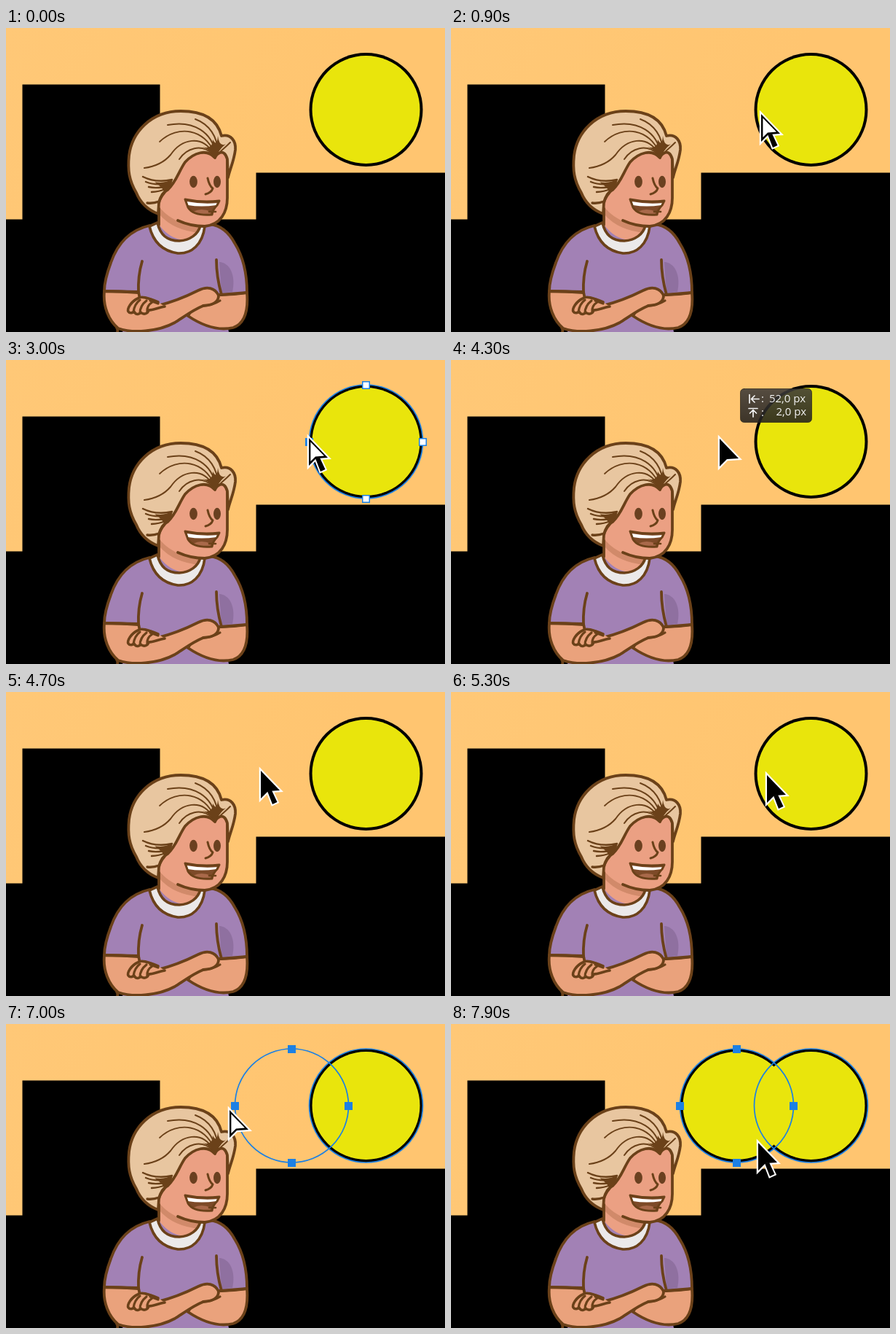
Animation of 603 by 417 pixels, one loop 8 s. Source, as an HTML page with a canvas:

```html
<!DOCTYPE html>
<html lang="en">
<head>
<meta charset="utf-8">
<title>Duplicating a circle path</title>
<style>
html, body { margin: 0; width: 100%; height: 100%; overflow: hidden; background: #000; }
canvas { display: block; width: 603px; height: 417px; }
</style>
</head>
<body>
<canvas id="stage" width="603" height="417"></canvas>
<script>
const ctx = document.getElementById('stage').getContext('2d');
const LOOP = 8000, STEP = 100;
const BLUE = '#1c80e4', BROWN = '#6b4119', SKIN = '#eaa27c', FACE = '#eba083', SHADE = '#d18a6a';
const HAIR = '#e8c6a0', SHIRT = '#a281b5', SHIRT_DARK = '#8f70a0', YELLOW = '#e9e50c';
const SUN = { x: 494.5, y: 112, r: 78 };
const COPY_SHIFT = 102;

// Pointer route: time, x, y
const route = [
  [400, 570, 133], [800, 403, 120], [900, 426, 118], [1200, 426, 118],
  [1600, 416, 100], [2100, 416, 100], [2200, 418, 104], [2700, 417, 104],
  [3000, 416, 107], [3200, 416, 107], [3400, 416, 108], [3700, 416, 109],
  [4300, 369, 108], [4600, 350, 108], [4800, 350, 108], [5300, 434, 114],
  [5400, 434, 114], [5700, 422, 118], [6400, 422, 118], [7000, 307, 118],
  [7100, 304, 118], [7300, 335, 115], [7600, 467, 140], [7900, 422, 163]
];

function pointerAt(t) {
  const i = route.findIndex(k => k[0] > t);
  if (i < 0) return route[route.length - 1].slice(1);
  const [t0, x0, y0] = route[i - 1], [t1, x1, y1] = route[i];
  const p = (t - t0) / (t1 - t0);
  return [x0 + (x1 - x0) * p, y0 + (y1 - y0) * p];
}

function shape(d, fill, stroke, width = 3.8) {
  const path = new Path2D(d);
  if (fill) { ctx.fillStyle = fill; ctx.fill(path); }
  if (stroke) { ctx.strokeStyle = stroke; ctx.lineWidth = width; ctx.stroke(path); }
}
const line = (d, width) => shape(d, null, BROWN, width);

function rect(x, y, w, h, fill) {
  ctx.fillStyle = fill;
  ctx.fillRect(x, y, w, h);
}

function disc(x, y, rx, ry, fill) {
  ctx.beginPath();
  ctx.ellipse(x, y, rx, ry, 0, 0, Math.PI * 2);
  ctx.fillStyle = fill;
  ctx.fill();
}

function drawScenery() {
  const sky = ctx.createLinearGradient(0, 0, 400, 200);
  sky.addColorStop(0, '#ffc877');
  sky.addColorStop(1, '#ffc570');
  rect(0, 0, 603, 417, sky);
  rect(22.5, 77.5, 189, 190, '#000');
  rect(0, 262.5, 603, 155, '#000');
  rect(343.5, 198.5, 260, 70, '#000');
}

function drawBody() {
  const shirt = 'M197 271C167 278 152 299 144 322C138 338 135 350 135 361L182 363L160 417H306L296 366L331 363' +
    'C331 339 326 314 314 295C306 280 295 271 280 269Z';
  shape(shirt, SHIRT);
  shape('M293 321C307 322 316 338 311 362L296 364Z', SHIRT_DARK);
  line('M135 361C135 350 138 338 144 322C152 299 167 278 197 271');
  line('M280 269C295 271 306 280 314 295C326 314 331 339 331 363');

  // Right arm, passing under
  shape('M294 366L331 363C333 389 327 406 312 411C291 416 268 407 250 395L262 374Z', SKIN, BROWN);

  // Left arm, crossing over
  shape('M135 361C133 382 141 401 154 412C174 419 208 417 232 404C246 395 258 386 271 381' +
    'C283 380 292 377 292 367C287 356 276 354 264 360C244 370 229 376 208 381L184 372L182 362Z', SKIN, BROWN);
  line('M152 411Q154 414 153 417');
  line('M270 381Q283 381 294 374', 3.2);

  // Folded hand
  shape('M209 376C195 370 185 367 181 371C172 375 166 385 168 389C171 393 176 389 176 389' +
    'C179 395 184 392 185 390C189 394 195 392 196 387C202 387 208 384 218 382', SKIN, BROWN, 3.6);
  line('M184 373Q176 379 175 390M193 374Q184 381 184 391M201 376Q193 381 194 389', 3.2);
  line('M198 374L209 378', 3.2);

  line('M135 361Q158 361 182 363M293 366Q314 366 331 363');
  line('M187 320Q181 340 182 363M289 318Q289 341 296 366');
}

function drawHead() {
  shape('M210 234V270Q237 304 268 281V262Z', FACE);
  shape('M211 246C222 260 242 271 268 272L267 281Q230 278 211 256Z', SHADE);
  line('M210 238V270');
  shape('M197 272L208 267C212 285 222 292 238 292C253 291 264 283 267 271L273 272' +
    'C270 297 255 310 236 309C215 306 202 293 197 272Z', '#ebe9e9', BROWN, 3.6);

  shape('M287 160L304 178V233C304 252 295 270 273 272C250 272 228 264 211 246V215L240 175Z', FACE);
  line('M304 180V233C304 252 295 270 273 272C259 272 247 269 236 264');

  disc(257.5, 211, 5.4, 8.2, '#6a4020');
  disc(290, 211, 5, 8.2, '#6a4020');
  line('M277 206Q279 216 284 220Q282 226 274 228', 3);

  const mouth = 'M246 235Q270 240 293 237L290 243Q284 249 283 256Q257 258 250 246Z';
  shape(mouth, '#7d4a28');
  shape('M257 252Q268 246 282 252L280 256Q265 257 257 252Z', '#a9694a');
  shape('M248 238Q270 242 291 240L289 243Q268 246 250 243Z', '#fff');
  line(mouth, 3);
  line('M279 252H288', 2.6);
}

function drawHair() {
  const outline = 'M209 255C196 250 185 241 179 226C169 209 167 195 169 175C173 143 199 114 240 114' +
    'C270 114 290 124 296 148C309 145 316 155 315 167C313 183 308 192 305 205L304 180' +
    'Q301 169 294 171Q289 173 287 178C276 165 258 171 246 184C237 197 234 211 222 222Q213 226 210 240Z';
  shape(outline, HAIR, BROWN);

  // Strands gathered at the parting
  line('M288 172C283 144 259 126 222 133', 2);
  line('M286 171C273 139 237 132 211 156', 1.8);
  line('M291 171C291 149 279 132 260 125', 2);
  line('M284 171C269 146 241 152 226 174Q213 189 190 192', 2);
  line('M284 173C268 158 248 165 238 180', 2);
  line('M291 173C297 167 303 162 308 157', 2);
  shape('M270 163Q284 167 284 153Q290 164 291 148Q293 164 302 159Q291 168 288 179Q282 168 270 163Z', BROWN);

  // Wisps above the ear
  for (let i = 0; i < 4; i++) {
    line(`M${188 + i * 4} ${204 + i * 7}Q${206 + i} ${213 + i * 4} ${228 - i * 2} ${208 + i * 4}`, 2.4);
  }
  shape('M204 211Q217 214 229 207Q228 216 219 226Q214 218 204 211Z', BROWN);
  line('M194 240Q202 241 210 238Q214 230 220 223', 3.4);
}

function drawCircles(xs) {
  xs.forEach(x => disc(x, SUN.y, SUN.r, SUN.r, '#000'));
  xs.forEach(x => disc(x, SUN.y, SUN.r - 4, SUN.r - 4, YELLOW));
}

function drawPath(x) {
  ctx.beginPath();
  ctx.arc(x, SUN.y, SUN.r, 0, Math.PI * 2);
  ctx.strokeStyle = BLUE;
  ctx.lineWidth = 1.7;
  ctx.stroke();
}

function drawHandles(x, solid) {
  for (let i = 0; i < 4; i++) {
    const a = i * Math.PI / 2;
    const hx = Math.round(x + SUN.r * Math.cos(a) - 5.5);
    const hy = Math.round(SUN.y + SUN.r * Math.sin(a) - 5.5);
    rect(hx, hy, 11, 11, BLUE);
    if (!solid && i !== 2) rect(hx + 1.5, hy + 1.5, 8, 8, '#fff');
  }
}

const HEAD = 'M0 0V38L10 28L26 27Z';
const TAIL = 'M9 28L16 46L22.5 43L15 27Z';

function drawPointer(x, y, white, tail) {
  ctx.save();
  ctx.translate(Math.round(x), Math.round(y));
  ctx.lineJoin = 'miter';
  ctx.miterLimit = 3;
  if (tail) shape(TAIL, '#000', '#fff', 4);
  shape(HEAD, '#000', '#fff', 4.5);
  if (tail) shape(TAIL, '#000');
  shape(HEAD, '#000');
  if (white) shape('M2.4 5.6V32L9 25.6L21 24.6Z', '#fff');
  ctx.restore();
}

function drawReadout(x, y, dx, dy) {
  ctx.save();
  ctx.translate(Math.round(x) + 28, Math.round(y) - 69);
  const shade = ctx.createLinearGradient(0, 0, 0, 47);
  shade.addColorStop(0, 'rgba(62,60,58,.88)');
  shade.addColorStop(1, 'rgba(34,32,30,.88)');
  ctx.beginPath();
  ctx.roundRect(0.5, 0.5, 98, 46, 5);
  ctx.fillStyle = shade;
  ctx.fill();
  ctx.strokeStyle = 'rgba(40,36,28,.7)';
  ctx.lineWidth = 1;
  ctx.stroke();
  shape('M13 8.5V20M15.5 14.5H26M20 10L15.5 14.5L20 19', null, '#f4f4f4', 1.7);
  shape('M12 27.5H24M18 30V39M13.5 34L18 29.5L22.5 34', null, '#f4f4f4', 1.7);
  ctx.fillStyle = '#f4f4f4';
  ctx.font = '15px "Open Sans", "Noto Sans", sans-serif';
  ctx.fillText(':', 29, 19);
  ctx.fillText(':', 29, 38);
  ctx.textAlign = 'right';
  ctx.fillText(dx + ',0 px', 90, 19);
  ctx.fillText(dy + ',0 px', 91, 37);
  ctx.restore();
}

function draw(time) {
  const t = Math.floor((time % LOOP) / STEP) * STEP;
  const within = (a, b) => t >= a && t < b;
  const copied = t >= 7200;

  ctx.lineCap = ctx.lineJoin = 'round';
  drawScenery();
  drawBody();
  drawHead();
  drawHair();

  const [x, y] = t >= 400 ? pointerAt(t) : [0, 0];
  const shift = copied ? COPY_SHIFT : Math.min(COPY_SHIFT, (422 - x) * 0.9);
  drawCircles(copied ? [SUN.x - COPY_SHIFT, SUN.x] : [SUN.x]);

  if (within(2100, 3800)) {
    drawPath(SUN.x);
    drawHandles(SUN.x, false);
  } else if (t >= 6000) {
    const cx = t >= 6500 ? SUN.x - shift : SUN.x;
    drawPath(SUN.x);
    drawPath(cx);
    drawHandles(cx, true);
  }

  if (t < 400) return;
  const dragging = within(3800, 4600) || within(6500, 7200);
  const white = t < 3800 || within(6500, 7200);
  drawPointer(x, y, white, !dragging);
  if (within(3800, 4600)) {
    const pulled = 416 - x;
    drawReadout(x, y, Math.round(pulled * 1.106), Math.round(pulled * 0.04));
  }
}

const start = performance.now();
function tick() {
  draw(performance.now() - start);
  requestAnimationFrame(tick);
}
tick();
</script>
</body>
</html>
```
